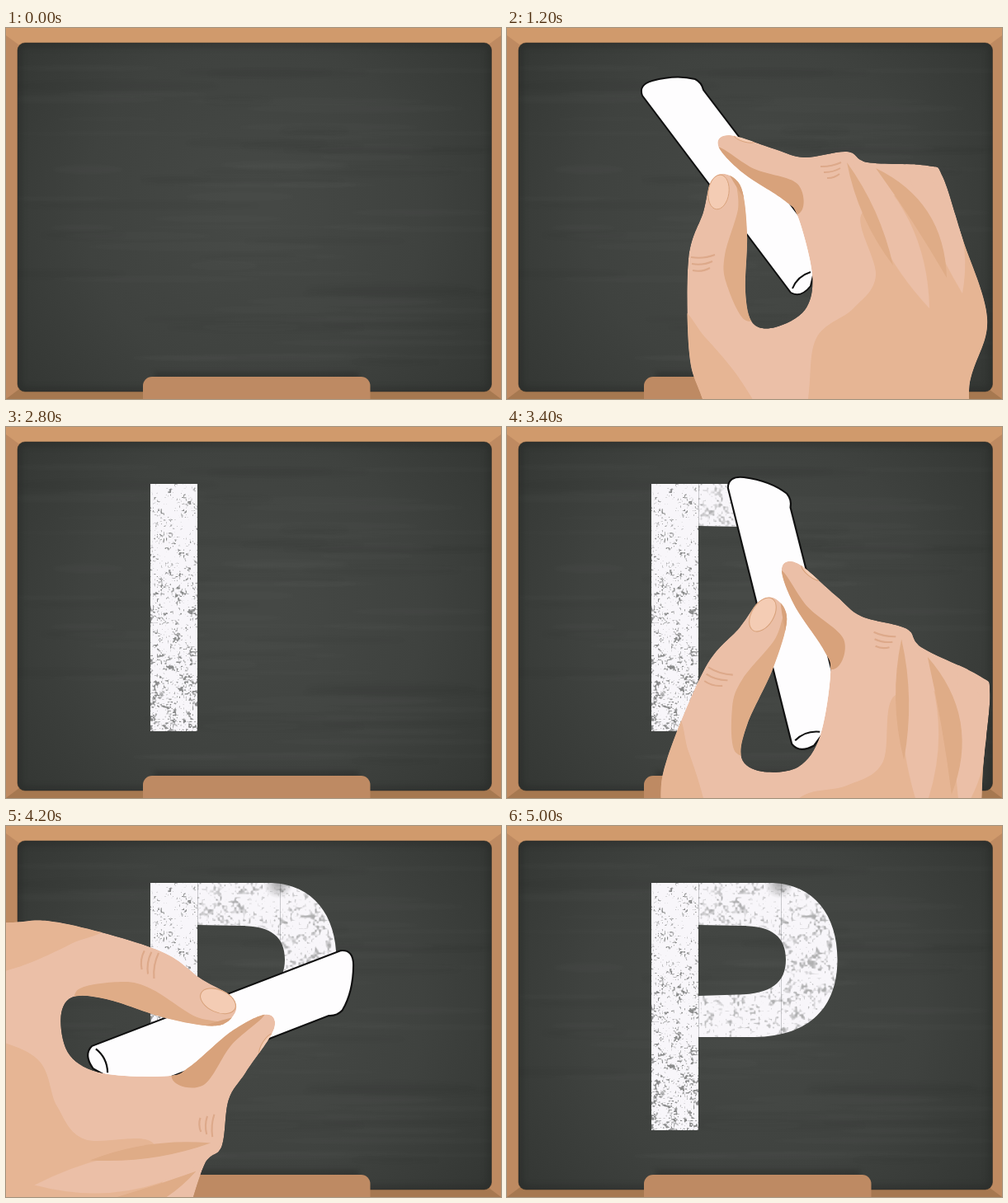
These frames come from a looping animation (600x450 px, 5.2 s). An HTML page with a canvas:

```html
<!DOCTYPE html>
<html lang="en">
<head>
<meta charset="utf-8">
<title>Writing the letter P</title>
<style>
html, body { margin: 0; width: 100%; height: 100%; overflow: hidden; background: #3a3d3a; }
canvas { display: block; width: 600px; height: 450px; }
</style>
</head>
<body>
<canvas id="stage" width="600" height="450"></canvas>
<script>
const W = 600, H = 450, LOOP = 5200, STEP = 200;
const LIGHT = '#ebbfa7', SKIN = '#e6b594', SOFT = '#dfac87', SHADE = '#d8a27b';
const ctx = document.getElementById('stage').getContext('2d');

function layer(paint) {
  const c = document.createElement('canvas');
  c.width = W;
  c.height = H;
  paint(c.getContext('2d'));
  return c;
}

function seeded(seed) {
  return () => (seed = (seed * 16807) % 2147483647) / 2147483647;
}

function hash(x, y) {
  const s = Math.sin(x * 127.1 + y * 311.7) * 43758.5453;
  return s - Math.floor(s);
}

function noise(x, y) {
  const i = Math.floor(x), j = Math.floor(y), u = x - i, v = y - j;
  const a = hash(i, j) * (1 - u) + hash(i + 1, j) * u;
  const b = hash(i, j + 1) * (1 - u) + hash(i + 1, j + 1) * u;
  return a * (1 - v) + b * v;
}

// Closed smooth curve through a few key points.
function blob(...pts) {
  const n = pts.length / 2, path = new Path2D();
  const at = i => [pts[2 * ((i + n) % n)], pts[2 * ((i + n) % n) + 1]];
  path.moveTo(...at(0));
  for (let i = 0; i < n; i++) {
    const [a, b, c, d] = [-1, 0, 1, 2].map(k => at(i + k));
    path.bezierCurveTo(
      b[0] + (c[0] - a[0]) / 6, b[1] + (c[1] - a[1]) / 6,
      c[0] - (d[0] - b[0]) / 6, c[1] - (d[1] - b[1]) / 6, c[0], c[1]);
  }
  return path;
}

// Sliver between two points, its two sides bulging by p and q.
function leaf(x0, y0, x1, y1, p, q) {
  const len = Math.hypot(x1 - x0, y1 - y0);
  const nx = (y1 - y0) / len, ny = (x0 - x1) / len;
  const mx = (x0 + x1) / 2, my = (y0 + y1) / 2;
  const path = new Path2D();
  path.moveTo(x0, y0);
  path.quadraticCurveTo(mx + nx * p, my + ny * p, x1, y1);
  path.quadraticCurveTo(mx + nx * q, my + ny * q, x0, y0);
  return path;
}

const board = layer(g => {
  g.fillStyle = '#be8a61';
  g.fillRect(0, 0, W, H);
  g.fillStyle = '#d09a6c';
  g.fill(new Path2D('M0 0H600V9L585 20H15L0 9Z'));
  g.fillStyle = '#a67850';
  g.fill(new Path2D('M0 450L16 438H584L600 450Z'));

  const slate = new Path2D();
  slate.roundRect(14, 18, 574.5, 423, 9);
  g.save();
  g.clip(slate);
  const glow = g.createRadialGradient(300, 215, 30, 300, 225, 350);
  glow.addColorStop(0, '#454845');
  glow.addColorStop(0.55, '#3f423f');
  glow.addColorStop(1, '#343734');
  g.fillStyle = glow;
  g.fillRect(0, 0, W, H);

  const rnd = seeded(77);
  g.filter = 'blur(2px)';
  for (let i = 0; i < 70; i++) {
    g.fillStyle = rnd() < 0.65 ? 'rgba(255,255,255,.016)' : 'rgba(0,0,0,.03)';
    g.beginPath();
    g.ellipse(60 + rnd() * 480, 45 + rnd() * 360, 40 + rnd() * 110, 2 + rnd() * 4, 0, 0, 7);
    g.fill();
  }
  g.filter = 'blur(4px)';
  g.strokeStyle = 'rgba(25,28,25,.4)';
  g.lineWidth = 7;
  g.stroke(slate);
  g.restore();
  g.strokeStyle = 'rgba(50,44,36,.5)';
  g.stroke(slate);

  g.fillStyle = 'rgba(25,25,22,.35)';
  g.filter = 'blur(3px)';
  g.fillRect(180, 418, 248, 6);
  g.filter = 'none';
  g.fillStyle = '#be8a63';
  g.beginPath();
  g.roundRect(166, 423, 275.5, 50, 11);
  g.fill();
});

// Worn chalk texture cut to the shape of the letter.
const letter = layer(g => {
  const w = 227, h = 300, img = g.createImageData(w, h);
  const grain = (x, y, fine, coarse) =>
    noise(x / fine, y / fine) * 0.6 + noise(x / coarse + 50, y / coarse) * 0.4;
  for (let y = 0; y < h; y++) {
    for (let x = 0; x < w; x++) {
      const wear = x < 57
        ? Math.min(0.6, (grain(x, y, 1.6, 6) - 0.64 + 0.1 * y / h) * 3)
        : Math.min(0.4, (grain(x, y, 2.5, 8) - 0.55) * 1.4);
      img.data.set([248, 246, 250, 255 * (1 - Math.max(0, wear))], (y * w + x) * 4);
    }
  }
  g.putImageData(img, 175, 69);

  g.globalCompositeOperation = 'destination-in';
  g.fill(new Path2D(
    'M175 69H232V369H175Z ' +
    'M232 69H322C372 71 400.5 108 400.5 162C400.5 219 368 255 300 256H232' +
    'V206L280 204.5C320 204 338 190 338 162C338 135 322 121 284 121L232 120Z'));
  g.globalCompositeOperation = 'source-atop';
  g.fillStyle = 'rgba(60,62,66,.25)';
  for (const x of [232, 332]) g.fillRect(x, 69, 1, 187);
  const smudge = g.createRadialGradient(330, 70, 1, 330, 70, 18);
  smudge.addColorStop(0, 'rgba(60,62,60,.4)');
  smudge.addColorStop(1, 'rgba(60,62,60,0)');
  g.fillStyle = smudge;
  g.fillRect(305, 69, 50, 20);
});

const chalk = new Path2D(
  'M164 82Q159 69 176 64Q205 56 228 62Q236 66 238 75L380 262L368 313Q356 328 344 321Z');
const chalkEnd = new Path2D('M346 316Q352 301 368 296');

const hand = blob(
  256, 143, 270, 130, 325, 147, 360, 157, 412, 150, 437, 163, 510, 167,
  528, 180, 552, 255, 582, 352, 562, 425, 530, 540, 270, 540, 237, 450,
  221, 395, 220, 280, 238, 223, 247, 186, 264, 177, 284, 194, 291, 250,
  289, 320, 298, 358, 325, 363, 361, 342, 370, 300, 353, 230, 336, 209, 285, 175);

const shading = [
  [SKIN, blob(430, 225, 447, 300, 420, 340, 375, 376, 365, 450, 350, 560, 640, 560, 620, 330, 500, 210)],
  [SKIN, blob(210, 350, 240, 375, 285, 430, 305, 480, 280, 560, 200, 480)],
  [LIGHT, leaf(418, 150, 512, 340, 50, -32)],
  [LIGHT, leaf(480, 155, 552, 322, 60, -12)],
  [SOFT, leaf(412, 163, 468, 288, 14, -16)],
  [SOFT, leaf(447, 170, 533, 303, 48, 4)],
  [SOFT, blob(280, 185, 280, 220, 264, 275, 266, 310, 290, 355, 320, 330, 310, 220)],
  [SHADE, blob(255, 146, 300, 171, 352, 189, 354, 225, 300, 220)]
];

function nail(x, y, rx, ry, turn) {
  ctx.beginPath();
  ctx.ellipse(x, y, rx, ry, turn, 0, 7);
  ctx.fillStyle = '#f4ccb4';
  ctx.fill();
  ctx.strokeStyle = SHADE;
  ctx.lineWidth = 1;
  ctx.stroke();
}

function drawHand({ x, y, turn, size }) {
  ctx.save();
  ctx.translate(x, y);
  ctx.rotate(turn * Math.PI / 180);
  ctx.scale(size, size);
  ctx.translate(-162, -72);

  ctx.fillStyle = '#fefdfe';
  ctx.fill(chalk);
  ctx.strokeStyle = '#101010';
  ctx.lineWidth = 2;
  ctx.stroke(chalk);
  ctx.stroke(chalkEnd);

  ctx.clip(hand);
  ctx.fillStyle = LIGHT;
  ctx.fill(hand);
  for (const [color, path] of shading) {
    ctx.fillStyle = color;
    ctx.fill(path);
  }
  ctx.strokeStyle = '#dda98a';
  ctx.lineWidth = 2;
  for (let i = 0; i < 3; i++) {
    ctx.stroke(leaf(223 + i, 278 + 8 * i, 252 - 3 * i, 275 + 8 * i, -4, -4));
    ctx.stroke(leaf(380 + 4 * i, 168 + 7 * i, 405 - i, 163 + 7 * i, -3, -3));
  }
  nail(288, 134, 13, 4, 0.28);
  nail(256.5, 199, 12.5, 21, 0.14);
  ctx.restore();
}

// One entry per chalk stroke: tip position after k steps, and the part of
// the letter uncovered so far as [left, top, right, bottom].
const strokes = [
  {
    from: 1200, to: 2400, turn: 0, size: 1,
    tip: k => { k = Math.min(k, 3); return [162, 72 + 84 * k + 2.7 * k * k]; },
    area: (x, y) => [175, 69, 232, y - 2], full: [175, 69, 232, 369]
  },
  {
    from: 3200, to: 3600, turn: 23, size: 1.07,
    tip: k => [209 + 61 * k, 63],
    area: x => [232, 69, x + 22, 121], full: [232, 69, 332, 121]
  },
  {
    from: 3600, to: 4400, turn: 106, size: 1.08,
    tip: k => [347 + 70 * Math.sin(k * Math.PI / 6), Math.min(55 + 39 * k, 152)],
    area: (x, y) => [290, 69, x - 8, y + 35], full: [290, 69, 402, 257]
  },
  {
    from: 4600, to: 5000, turn: 23, size: 1.07,
    tip: k => [215 - 15 * k, 179 + 10 * k],
    area: x => [x + 45, 200, 332, 257], full: [232, 200, 332, 257]
  }
];

function render(time) {
  const t = Math.floor((time % LOOP) / STEP) * STEP;
  const shown = new Path2D();
  let pose = null;
  for (const { from, to, turn, size, tip, area, full } of strokes) {
    if (t < from) break;
    let box = full;
    if (t < to) {
      const [x, y] = tip((t - from) / STEP);
      pose = { x, y, turn, size };
      box = area(x, y);
    }
    const [left, top, right, bottom] = box;
    shown.rect(left, top, right - left, bottom - top);
  }

  ctx.drawImage(board, 0, 0);
  ctx.save();
  ctx.clip(shown);
  ctx.drawImage(letter, 0, 0);
  ctx.restore();
  if (pose) drawHand(pose);
}

const start = performance.now();
function tick() {
  render(performance.now() - start);
  requestAnimationFrame(tick);
}
tick();
</script>
</body>
</html>
```
